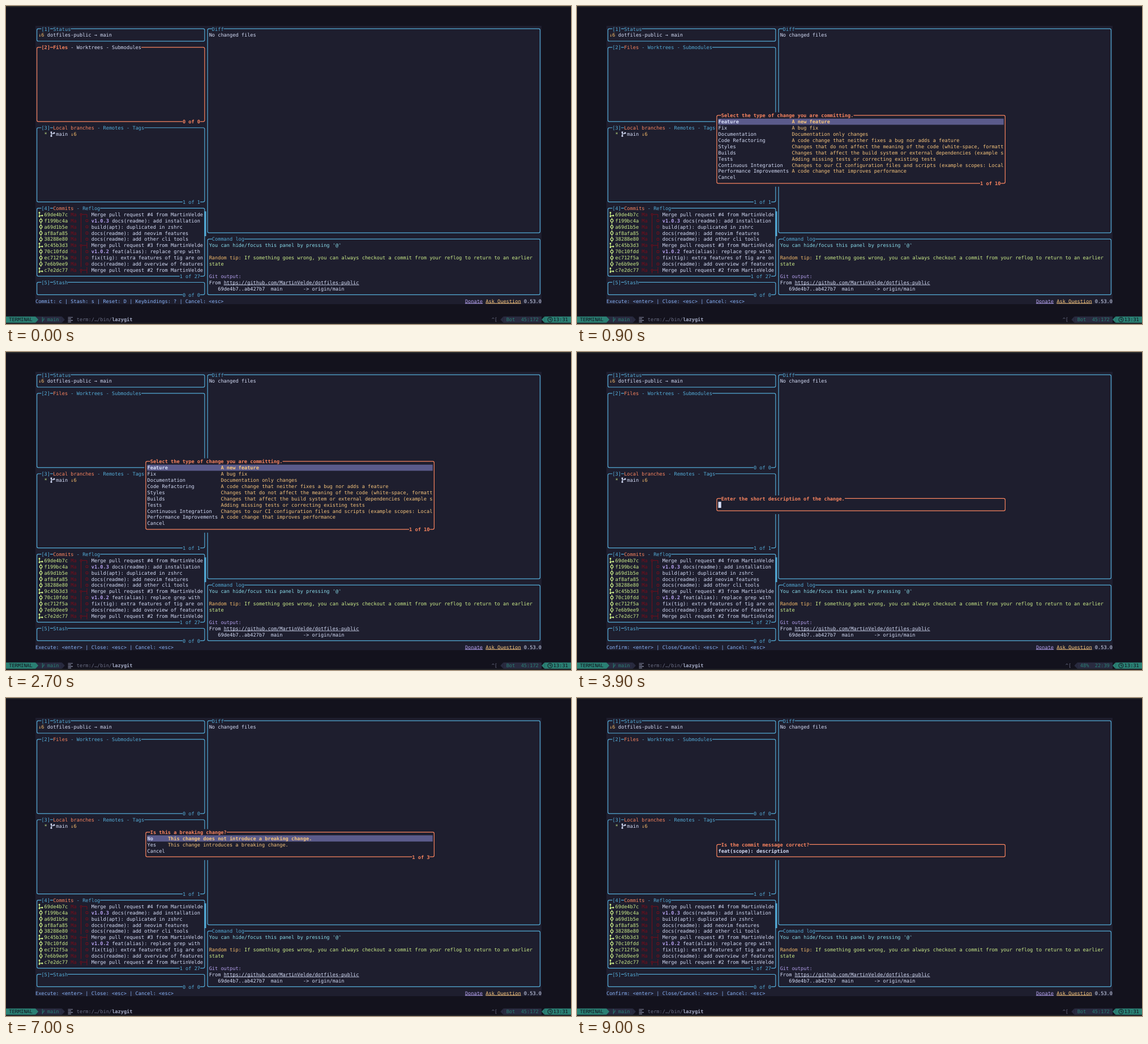
Write an HTML page with a canvas that moves like this. It is 998 px wide and 561 px high and loops after 9100 ms.

```html
<!DOCTYPE html>
<html lang="en">
<head>
<meta charset="utf-8">
<title>Conventional commit in lazygit</title>
<style>
html, body { margin: 0; width: 100%; height: 100%; overflow: hidden; background: #13121d; }
canvas { display: block; }
</style>
</head>
<body>
<canvas width="998" height="561"></canvas>
<script>
const ctx = document.querySelector('canvas').getContext('2d');
const LOOP = 9100, W = 998 / 192, H = 10.909, X0 = 10 * W, Y0 = 35.05;
const OUTER = '#13121d', BASE = '#1e1e2e', TEXT = '#d6def8', BLUE = '#54acd8', ORANGE = '#fa8560',
  YELLOW = '#f7c57c', GOLD = '#f5bb6a', LIME = '#cdee8a', CYAN = '#89dceb', MAUVE = '#b4a0ee',
  LINK = '#89b4fa', RED = '#790d1a', TEAL = '#2a8074', SECTION = '#292b40', SELECT = '#5b5b8b';

const colX = c => X0 + c * W, rowY = r => Y0 + r * H;
const midX = c => colX(c + .5), midY = r => rowY(r + .5);

function rect(x, y, w, h, color) {
  ctx.fillStyle = color;
  ctx.fillRect(x, y, w, h);
}

function cells(c, r, w, h, color) {
  rect(colX(c), rowY(r), w * W, h * H, color);
}

function text(s, c, r, color = TEXT, { bold, under, back } = {}) {
  if (back) cells(c, r, s.length, 1, back);
  ctx.font = `${bold ? 'bold ' : ''}8.634px "DejaVu Sans Mono", monospace`;
  ctx.fillStyle = color;
  ctx.fillText(s, colX(c), rowY(r) + 8.5);
  if (under) rect(colX(c), rowY(r) + 9.3, s.length * W, .9, color);
}

function stroke(color, width, draw) {
  ctx.strokeStyle = color;
  ctx.lineWidth = width;
  ctx.beginPath();
  draw();
  ctx.stroke();
}

function lines(color, width, ...paths) {
  stroke(color, width, () => paths.forEach(([x, y, ...rest]) => {
    ctx.moveTo(x, y);
    for (let i = 0; i < rest.length; i += 2) ctx.lineTo(rest[i], rest[i + 1]);
  }));
}

function ring(x, y, radius, color, width = 1.2) {
  stroke(color, width, () => ctx.arc(x, y, radius, 0, 7));
}

function dot(x, y, radius, color) {
  ctx.fillStyle = color;
  ctx.beginPath();
  ctx.arc(x, y, radius, 0, 7);
  ctx.fill();
}

function frame(c0, r0, c1, r1, color) {
  stroke(color, 1.2, () =>
    ctx.roundRect(midX(c0), midY(r0) - .3, (c1 - c0) * W, (r1 - r0) * H, 2.6));
}

function footer(s, c1, r1, color, bold) {
  text(s, c1 - 1 - s.length, r1, color, { bold, back: BASE });
}

function panel(c0, r0, c1, r1, { num, title, tabs, foot, focus }) {
  const color = focus ? ORANGE : BLUE;
  frame(c0, r0, c1, r1, color);
  let c = c0 + 2;
  if (num) {
    text(`[${num}]`, c, r0, color, { bold: focus, back: BASE });
    c += 4;
  }
  text(title, c, r0, tabs ? ORANGE : color, { bold: focus, back: BASE });
  if (tabs) text(tabs, c + title.length, r0, focus ? TEXT : BLUE, { back: BASE });
  if (foot) footer(foot, c1, r1, color, focus);
}

function popup(r0, r1, title) {
  cells(37, r0, 99, r1 - r0 + 1, BASE);
  frame(37, r0, 135, r1, ORANGE);
  text(title, 39, r0, ORANGE, { bold: true, back: BASE });
}

function menu(r0, title, items, descCol) {
  const r1 = r0 + items.length + 1;
  popup(r0, r1, title);
  cells(38, r0 + 1, 97, 1, SELECT);
  items.forEach(([name, desc = ''], i) => {
    const bold = i == 0;
    text(name, 38, r0 + 1 + i, TEXT, { bold });
    text(desc, descCol, r0 + 1 + i, YELLOW, { bold });
  });
  footer(`1 of ${items.length}`, 135, r1, ORANGE, true);
}

function prompt(title, typed) {
  popup(20, 22, title);
  text(typed, 38, 21);
  cells(38 + typed.length, 21, 1, 1, TEXT);
}

function fork(x, y, color, side) {
  lines(color, 1.2, [x, y - 3, x, y + 3], [x, y + 1 + side, x + 4.5, side > 0 ? y + 2 : y - 1]);
  dot(x, y - 3.2, 1.5, color);
  dot(x, y + 3.2, 1.5, color);
  dot(x + 5, side > 0 ? y + 2 : y - 2, 1.5, color);
}

const COMMITS = [
  ['69de4b7c', 'Merge pull request #4 from MartinVelde'],
  ['f199bc4a', 'docs(readme): add installation', 'v1.0.3'],
  ['a69d1b5e', 'build(apt): duplicated in zshrc'],
  ['af8afa85', 'docs(readme): add neovim features'],
  ['38288e80', 'docs(readme): add other cli tools'],
  ['9c45b3d3', 'Merge pull request #3 from MartinVelde'],
  ['70c10fdd', 'feat(alias): replace grep with', 'v1.0.2'],
  ['ec712f5a', 'fix(tig): extra features of tig are on'],
  ['7e6b9ee9', 'docs(readme): add overview of features'],
  ['c7e2dc77', 'Merge pull request #2 from MartinVelde'],
];

const TYPES = [
  ['Feature', 'A new feature'],
  ['Fix', 'A bug fix'],
  ['Documentation', 'Documentation only changes'],
  ['Code Refactoring', 'A code change that neither fixes a bug nor adds a feature'],
  ['Styles', 'Changes that do not affect the meaning of the code (white-space, formatt'],
  ['Builds', 'Changes that affect the build system or external dependencies (example s'],
  ['Tests', 'Adding missing tests or correcting existing tests'],
  ['Continuous Integration', 'Changes to our CI configuration files and scripts (example scopes: Local'],
  ['Performance Improvements', 'A code change that improves performance'],
  ['Cancel'],
];

const BREAKING = [
  ['No', 'This change does not introduce a breaking change.'],
  ['Yes', 'This change introduces a breaking change.'],
  ['Cancel'],
];

function commit([hash, message, tag], i) {
  const r = 30 + i, y = midY(r), top = rowY(r), merge = message.startsWith('Merge');
  const left = midX(15), right = midX(17);
  if (merge) {
    fork(59, y, LIME, 1);
    ring(left, y, 1.6, RED, 1);
    lines(RED, 1, [left + 2, y, right, y], [right, i ? top : y, right, top + H]);
    lines(RED, 1, [left, y + 2, left, top + H]);
  } else {
    ring(61.6, y, 2.3, LIME);
    lines(LIME, 1.2, [61.6, y - 5, 61.6, y - 2.3], [61.6, y + 2.3, 61.6, y + 5]);
    lines(RED, 1, [left, top, left, top + H]);
    stroke(RED, 1, () => ctx.roundRect(right - 1.9, y - 1.9, 3.8, 3.8, 1));
  }
  text(hash, 3, r, LIME);
  text('Ma', 12, r, RED);
  if (tag) text(tag, 19, r, MAUVE, { bold: true });
  text(message, tag ? 26 : 19, r);
}

function panels(filesFocused) {
  panel(0, 0, 57, 2, { num: 1, title: 'Status' });
  text('↓6', 1, 1, GOLD);
  text('dotfiles-public → main', 4, 1);

  panel(0, 3, 57, 15, { num: 2, title: 'Files', tabs: ' - Worktrees - Submodules',
    foot: '0 of 0', focus: filesFocused });

  panel(0, 16, 57, 28, { num: 3, title: 'Local branches', tabs: ' - Remotes - Tags', foot: '1 of 1' });
  text('*', 3, 17, LIME);
  fork(80, midY(17), TEXT, -1);
  text('main', 7, 17);
  text('↓6', 12, 17, GOLD);

  panel(0, 29, 57, 40, { num: 4, title: 'Commits', tabs: ' - Reflog', foot: '1 of 27' });
  COMMITS.forEach(commit);
  rect(midX(57) - .3, rowY(30), W / 2 + .3, 4 * H, BLUE);

  panel(0, 41, 57, 43, { num: 5, title: 'Stash', foot: '0 of 0' });

  panel(58, 0, 171, 33, { title: 'Diff' });
  text('No changed files', 59, 1);

  panel(58, 34, 171, 43, { title: 'Command log' });
  text("You can hide/focus this panel by pressing '@'", 59, 35, CYAN);
  text('Random tip:', 59, 37, GOLD);
  text('If something goes wrong, you can always checkout a commit from your reflog to return to an earlier', 71, 37, LIME);
  text('state', 59, 38, LIME);
  text('Git output:', 59, 40, MAUVE);
  text('From', 59, 41);
  text('https://github.com/MartinVelde/dotfiles-public', 64, 41, TEXT, { under: true });
  text('69de4b7..ab427b7  main       -> origin/main', 62, 42);

  text('Donate', 146, 44, MAUVE, { under: true });
  text('Ask Question', 153, 44, YELLOW, { under: true });
  text('0.53.0', 166, 44);
}

// Powerline separator filling one cell; dir is 1 for right, -1 for left.
function arrow(c, dir, color) {
  const y = rowY(47), base = colX(dir > 0 ? c : c + 1);
  ctx.fillStyle = color;
  ctx.beginPath();
  ctx.moveTo(base, y);
  ctx.lineTo(base + dir * W, y + H / 2);
  ctx.lineTo(base, y + H);
  ctx.fill();
}

function statusLine(percent, position) {
  const r = 47, y = midY(r), gray = '#6c7086';
  cells(0, r, 9, 1, SECTION);
  arrow(9, 1, SECTION);
  cells(-10, r, 10, 1, TEAL);
  arrow(0, 1, TEAL);
  text('TERMINAL', -9, r, OUTER);
  lines(TEAL, 1, [64.3, y - 4.5, 64.3, y + 4.5], [64.3, y + 2, 67, y, 67, y - 3]);
  text('main', 4, r, TEAL);
  lines('#8a8fa8', 1.2, ...[0, 1, 2, 3].map(i =>
    [109.5, y - 4 + i * 2.7, i % 2 ? 115 : 118, y - 4 + i * 2.7]));
  text('term:/…/bin/', 14, r, gray);
  text('lazygit', 26, r, '#a5abc5', { bold: true });

  const posCol = 171 - position.length, pctCol = posCol - 2 - percent.length;
  cells(pctCol - 1, r, 173 - pctCol, 1, SECTION);
  arrow(pctCol - 2, -1, SECTION);
  text('^[', pctCol - 5, r, gray);
  text(percent, pctCol, r, TEAL);
  text(position, posCol, r, TEAL);
  arrow(172, -1, TEAL);
  cells(173, r, 10, 1, TEAL);
  ring(961, y, 4, OUTER, 1);
  lines(OUTER, 1, [961, y - 2.5, 961, y, 963, y + 1]);
  text('13:31', 176, r, OUTER);
}

const typed = (word, t, start, step) => word.slice(0, Math.max(0, Math.floor((t - start) / step)));

function stateAt(t) {
  if (t < 500) return { kind: 'files' };
  if (t < 2800) return { kind: 'types' };
  if (t < 3700) return { kind: 'scope', input: typed('scope', t, 3000, 100) };
  if (t < 6500) return { kind: 'short', input: typed('description', t, 4650, 115) };
  return { kind: t < 7700 ? 'breaking' : 'confirm' };
}

function draw(t) {
  const { kind, input } = stateAt(t);
  // The editor's status line refreshes once a second, so it lags behind the input.
  const shown = stateAt(Math.floor(t / 1000) * 1000).input;

  rect(0, 0, 998, 561, OUTER);
  rect(0, 0, 998, 2, '#2a2a2c');
  rect(0, 559, 998, 2, '#242427');
  cells(0, 0, 172, 45, BASE);
  panels(kind == 'files');

  let keys = 'Execute: <enter> | Close: <esc> | Cancel: <esc>';
  if (kind == 'files') keys = 'Commit: c | Stash: s | Reset: D | Keybindings: ? | Cancel: <esc>';
  if (input != null || kind == 'confirm') keys = 'Confirm: <enter> | Close/Cancel: <esc> | Cancel: <esc>';
  text(keys, 0, 44, LINK);

  if (kind == 'types') menu(14, 'Select the type of change you are committing.', TYPES, 63);
  if (kind == 'scope') prompt('Enter the scope of the change.', input);
  if (kind == 'short') prompt('Enter the short description of the change.', input);
  if (kind == 'breaking') menu(18, 'Is this a breaking change?', BREAKING, 45);
  if (kind == 'confirm') {
    popup(20, 22, 'Is the commit message correct?');
    text('feat(scope): description', 38, 21, TEXT, { bold: true });
  }

  if (shown == null) statusLine('Bot', '45:172');
  else statusLine('48%', `22:${39 + shown.length}`);
}

ctx.textRendering = 'geometricPrecision';
// An invisible skew keeps baselines from snapping to whole pixels.
ctx.setTransform(1, 1e-5, 0, 1, 0, 0);
(function tick() {
  draw(performance.now() % LOOP);
  requestAnimationFrame(tick);
})();
</script>
</body>
</html>
```
